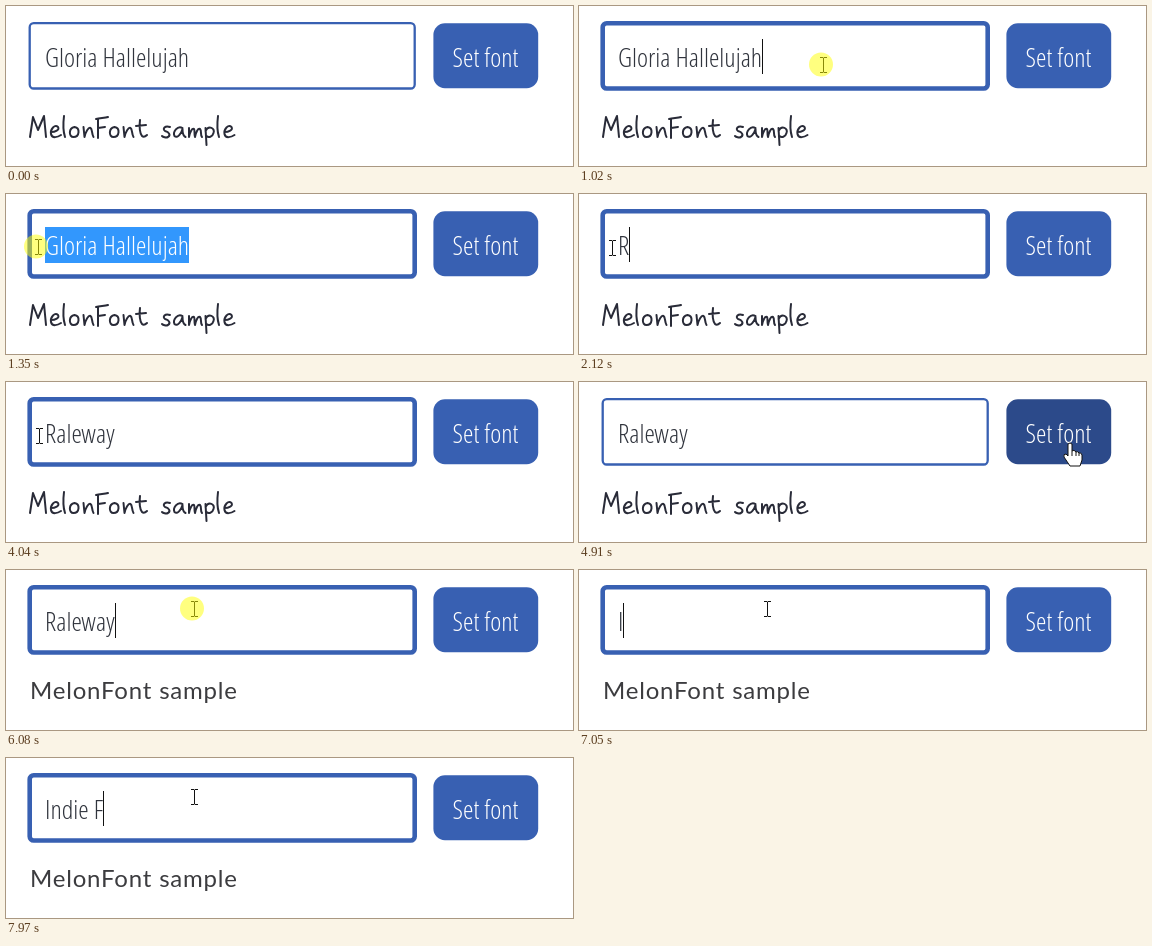
Animation of 567 by 160 pixels, one loop 8000 ms. Source, as an HTML page:

```html
<!DOCTYPE html>
<html lang="en">
<head>
<meta charset="utf-8">
<title>Font picker</title>
<style>
  html, body { margin: 0; width: 100%; height: 100%; overflow: hidden; background: #fff; }
  #stage { position: relative; width: 567px; height: 160px; overflow: hidden; }
  #stage > * { position: absolute; white-space: pre; }
  .label { font: 300 26.6px/35px "Open Sans Condensed Light", "Noto Sans ExtraCondensed Light", "Noto Sans", sans-serif; font-stretch: 62.5%; }
  #value { left: 39px; top: 34px; height: 35px; color: #30343d; }
  #selected.on { background: #3297fd; color: #fff; }
  #caret { position: absolute; left: 100%; top: -1px; width: 1px; height: 35px; background: #111; }
  #button { left: 427px; top: 34px; width: 105px; color: #fff; text-align: center; }
  #plain { left: 24px; top: 104px; font: 400 24px/32px Lato, sans-serif; letter-spacing: .8px; color: #3c3c3f; }
  svg { left: 0; top: 0; width: 567px; height: 160px; }
  #field { fill: none; stroke: #3860b2; stroke-width: 2.3; }
  #field.focus { stroke-width: 4.6; }
  #face { fill: #3860b2; }
  #face.hover { fill: #2c4a8a; }
  #hand { fill: none; stroke: #292b38; stroke-width: 2; stroke-linecap: round; stroke-linejoin: round; }
</style>
</head>
<body>
<div id="stage">
  <svg>
    <rect id="field" x="23.7" y="17.2" width="385" height="65.3" rx="4"/>
    <rect id="face" x="427.4" y="17.3" width="104.8" height="64.9" rx="11.5"/>
  </svg>
  <div id="value" class="label"><span id="before"></span><span id="selected"></span><i id="caret"></i></div>
  <div id="button" class="label">Set font</div>
  <div id="plain">MelonFont sample</div>
  <svg>
    <g id="hand" role="img" aria-label="MelonFont sample"></g>
    <g id="pointer">
      <path id="beam" d="M-3-7.5H0L.5-7L1-7.5H4M.5-7V7M-3 7.5H0L.5 7L1 7.5H4" fill="none" stroke="#111"/>
      <path id="arrow" d="M0 0V17L4 13L7 20L10 19L7 12H12Z" fill="#fff" stroke="#111"/>
      <path id="finger" d="M-2 1Q0-1 2 1V8Q4 6 6 9Q8 8 9 10Q11 9 12 12V17L10 23H0L-6 14Q-7 11-4 11L-2 13Z M2 8V13M6 9V13M9 10V13" fill="#fff" stroke="#111"/>
      <circle id="press" cx="-2" cy="-.5" r="12" fill="#ff0" fill-opacity=".5"/>
    </g>
  </svg>
</div>
<script>
const LOOP = 8000;
const $ = id => document.getElementById(id);
const within = (t, ...spans) => spans.some(([from, to]) => t >= from && t < to);
const show = (id, on) => { $(id).style.display = on ? "" : "none"; };

// Pen strokes of the handwritten sample, baseline at 0
const strokes = {
  M: "M0 0L3-20L8-7L14-21L16 0",
  e: "M1-5C5-5 10-7 8-10C5-13 0-8 1-3C2 2 8 0 11-2",
  l: "M1-21C0-13 0-6 2 0",
  o: "M5-10C-1-9-1 0 4 0C10 0 11-9 5-10",
  n: "M1-10L2 0C3-5 6-10 8-9C10-8 9-3 11 0",
  F: "M2-18L2 1M0-18C4-19 9-19 12-20M2-9L9-10",
  t: "M4-17C3-10 4-3 6-1C8 1 10-1 11-2M0-11L10-12",
  s: "M8-10C3-12 0-8 3-6C7-5 9-2 6 0C4 1 1 0 0-1",
  a: "M9-9C4-12-1-5 1-1C4 2 8-4 9-8C9-4 10-1 12 0",
  m: "M1-9L1 0C2-5 4-9 6-8C7-7 6-3 7 0C8-5 10-9 12-8C14-6 12-2 14 0",
  p: "M1-9L2 8M1-6C4-12 11-9 9-4C8 0 4 1 2-1"
};
const advance = { M: 20, e: 13, l: 6.5, o: 13, n: 13.5, F: 13.5, t: 13.5, s: 11.5, a: 14.5, m: 16.5, p: 12.5, " ": 12.5 };
let penX = 24;
for (const letter of "MelonFont sample") {
  if (strokes[letter]) {
    const path = document.createElementNS("http://www.w3.org/2000/svg", "path");
    path.setAttribute("d", strokes[letter]);
    path.setAttribute("transform", `translate(${penX} 131)`);
    $("hand").append(path);
  }
  penX += advance[letter];
}

const entries = [
  { word: "Gloria Hallelujah", start: 0, keys: [] },
  { word: "Raleway", start: 2120, keys: [2120, 2350, 2630, 2970, 3200, 3380, 3530] },
  { word: "Indie F", start: 7050, keys: [7050, 7280, 7330, 7510, 7590, 7740, 7970] }
];
const clicks = [980, 6080];
const inputTimes = [...clicks, ...entries.flatMap(e => e.keys)];

// time, x, y
const route = [
  [340, 262, 172], [900, 244, 59], [1065, 244, 59], [1150, 41, 53], [1300, 31, 53], [1430, 33, 54],
  [4150, 33, 54], [4270, 541, 88], [4530, 541, 88], [4780, 491, 61],
  [5220, 491, 61], [5370, 188, 39], [LOOP, 188, 39]
];

function pointerAt(t) {
  const i = route.findIndex(stop => stop[0] > t);
  if (i < 1) return [262, 190];
  const [t0, x0, y0] = route[i - 1], [t1, x1, y1] = route[i];
  const u = (t - t0) / (t1 - t0), k = u * u * (3 - 2 * u);
  return [x0 + (x1 - x0) * k, y0 + (y1 - y0) * k];
}

function drawValue(t, focused, x) {
  const entry = entries.findLast(e => t >= e.start);
  const typed = entry.keys.length ? entry.keys.filter(k => k <= t).length : entry.word.length;
  const text = entry.word.slice(0, typed);
  const dragging = within(t, [1070, 2120]);
  const selecting = dragging || within(t, [6220, 7050]);
  const reach = dragging ? Math.min(1, Math.max(0, (x - 39) / 138)) : 0;
  const split = selecting ? Math.round(reach * text.length) : text.length;
  $("before").textContent = text.slice(0, split);
  $("selected").textContent = text.slice(split);
  $("selected").className = selecting ? "on" : "";
  const last = Math.max(...inputTimes.filter(k => k <= t), 0);
  show("caret", focused && !selecting && (t - last) % 1000 < 500);
}

function draw(t) {
  const [x, y] = pointerAt(t);
  const focused = within(t, [980, 4830], [6080, LOOP]);
  const onButton = x > 427 && x < 532 && y > 17 && y < 82;
  const onText = (x > 23 && x < 409 && y > 16 && y < 84) || (x < 409 && y > 108 && y < 140);

  $("field").classList.toggle("focus", focused);
  $("face").classList.toggle("hover", onButton);
  drawValue(t, focused, x);

  show("hand", t < 4960);
  show("plain", t >= 4960);
  show("press", within(t, [980, 1430], [4830, 4910], [6080, 6160], [6220, 6340]));
  show("beam", onText);
  show("finger", onButton);
  show("arrow", !onText && !onButton);
  $("pointer").setAttribute("transform", `translate(${Math.round(x)} ${Math.round(y)})`);
}

const begin = performance.now();
function tick() {
  draw((performance.now() - begin) % LOOP);
  requestAnimationFrame(tick);
}
tick();
</script>
</body>
</html>
```
